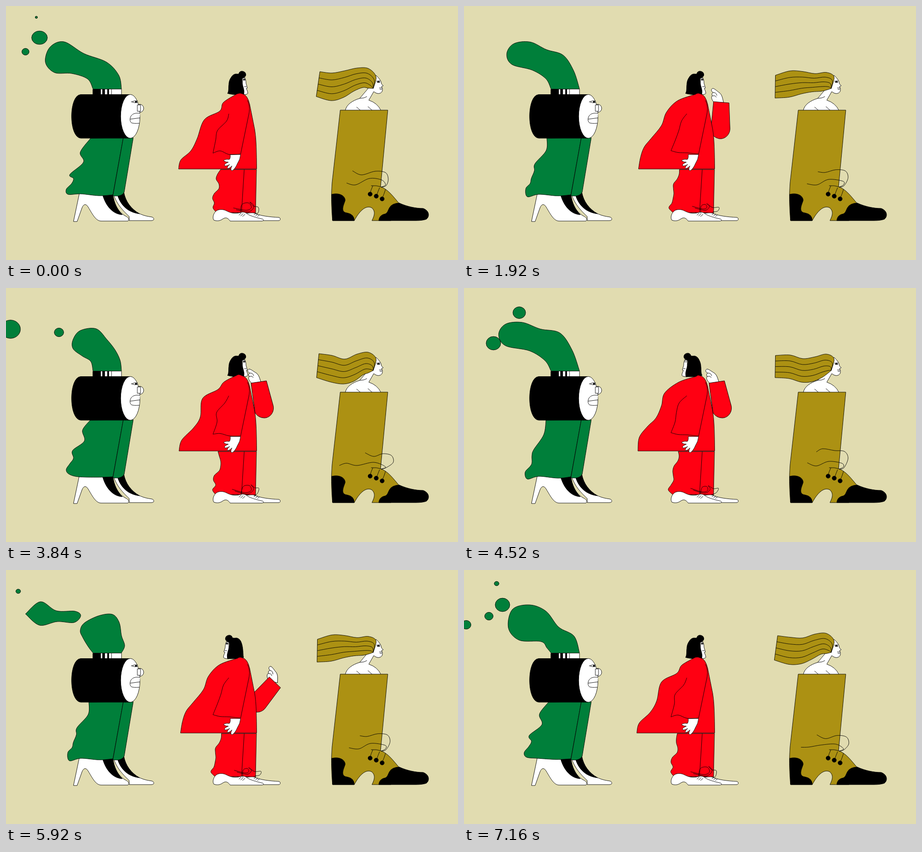
Recreate the animation shown at these times as an HTML page. Size 998 by 561 pixels, loop 7.2 s.

```html
<!DOCTYPE html>
<html lang="en">
<head>
<meta charset="utf-8">
<title>Three walkers</title>
<style>
html, body { margin: 0; width: 100%; height: 100%; overflow: hidden; background: #e1dcb0; }
svg { display: block; width: 100%; height: 100%; }
path, ellipse, circle { stroke: #000; stroke-width: .9; stroke-linejoin: round; vector-effect: non-scaling-stroke; }
.green { fill: #007f3a; }
.red { fill: #ff0012; }
.gold { fill: #ac9113; }
.white { fill: #fff; }
.line { fill: none; }
</style>
</head>
<body>
<svg viewBox="0 0 998 561">
  <g id="smoker">
    <path class="white" d="M238 418C247 442 262 455 272 465V474H321C328 474 328 468 322 466C285 462 265 440 260 411Z"/>
    <path d="M246 417C253 441 270 456 295 459C276 448 264 432 260 411Z"/>
    <path class="white" d="M162 414L149 476H157L167 448C171 436 177 436 182 445C190 458 198 475 210 475H269C273 473 272 467 262 463C246 453 238 436 236 416Z"/>
    <path d="M213 416C220 442 236 460 257 461C246 450 238 434 236 416Z"/>
    <path class="green" id="dress"/>
    <path class="green" d="M259 291H281L261 411C257 419 247 421 236 419Z"/>
    <path class="green" id="plume"/>
    <path class="white" d="M192 183.500H255V196H192Z"/>
    <path stroke="none" d="M192 184H209V196H192ZM213 184H218V196H213ZM224 184H227V196H224Z"/>
    <path class="line" d="M233 184V196"/>
    <path d="M165 195.500H274V292H165C138 290 138 197 165 195.500Z"/>
    <circle class="white" cx="295" cy="226" r="9"/>
    <ellipse class="white" cx="274.500" cy="243.700" rx="21.300" ry="48.300"/>
    <path class="white" stroke="none" d="M290 218.500H297V232.500H290Z"/>
    <path class="white" d="M296 237C287 236 280 237 276 243C273 248 273 255 277 258Q282 260 294 259"/>
    <path class="line" d="M274 250L296 247M276 212Q284 208 291 210M278 212Q285 215 291 213"/>
    <circle cx="287" cy="211.700" r="1.700"/>
    <g id="puffs"></g>
    <path class="green" id="peanut"/>
  </g>

  <g id="thinker">
    <g id="arm">
      <g id="fist">
        <path class="white" d="M543 211C536 204 534 199 537 195Q534 191 538 188C532 185 533 180 537 179C542 180 546 184 553 188C559 193 560 200 563 208Z"/>
        <path class="line" d="M538 188Q545 187 547 194M537 196Q543 193 546 198"/>
      </g>
      <path class="red" d="M541 210L575 205L590 260C593 273 584 287 570 287Q558 287 550 276Z"/>
    </g>
    <path class="white" d="M545 456C560 464 584 466 603 467C607 469 606 474 602 474H530V458Z"/>
    <path class="red" id="trousers"/>
    <path class="line" d="M526 361L520 456"/>
    <path class="white" d="M465 452C458 457 455 468 459 473C467 476 474 474 479 470C487 465 491 470 495 475H565C570 474 570 471 564 470C551 467 541 464 534 460Q526 453 518 456C506 460 496 457 488 453C479 448 470 449 465 452Z"/>
    <path class="line" d="M514 462l6-5m-2 7l6-6m-2 7l6-5m19 2l5-5m-1 7l5-5m-1 6l5-4"/>
    <path class="line" id="shoelaces"/>
    <path d="M491 192C492 166 496 151 508 150C520 151 523 166 524 192Z"/>
    <g id="head">
      <path class="white" d="M522 157C528 157 530 163 530 171L533 181L530.500 182Q534 189 534 193Q532 196 522 196Z"/>
      <path d="M489 193C493 188 491 180 492 174C492 159 502 150 514 150C515 143 523 142 528 147C532 153 528 158 522 159C519 165 522 173 524 180Q527 189 525 196H508Q495 195 489 193Z"/>
      <path class="line" d="M526 178L531 178M523 160L529 159"/>
      <path id="eye"/>
    </g>
    <path class="red" id="coat"/>
    <path class="white" d="M495 328Q496 336 493 339C488 338 480 339 481 342Q485 345 491 345C486 347 481 350 483 353Q487 354 494 350C490 353 487 358 490 359Q495 358 499 353C497 357 495 362 499 364Q506 360 511 348Q517 339 518 328Z"/>
    <path class="line" id="sleeve"/>
  </g>

  <g id="boot">
    <path class="white" d="M817 153Q829 164 829 172L833 176L829 178Q832 181 831 187C829 194 820 196 812 189L801 208Q820 214 828 231H749C752 217 765 209 781 204L798 184Z"/>
    <path class="line" d="M774 223L782 230M799 222L808 230M781 204Q791 204 797 200M824 181H831M825 184H830M818 166L826 165"/>
    <path id="womanEye"/>
    <path class="gold" id="hair"/>
    <path class="line" id="strands"/>
    <path class="gold" d="M738 230H843L827 399C844 405 855 421 868 436L850 474H808C815 460 815 453 808 446C794 438 779 455 769 474H721C717 430 719 405 720 390Z"/>
    <path d="M719 416C735 412 748 418 749 429C746 439 737 455 753 457Q769 460 769 474H721Z"/>
    <path d="M868 435C885 443 905 447 921 447C935 452 936 465 928 471Q920 474 905 474H823C824 466 828 462 834 460C843 459 843 451 847 445Q852 436 868 435Z"/>
    <path class="line" d="M806 397Q818 396 827 399M810 397Q805 407 804 415M825 401Q821 410 818 420M838 405Q835 415 830 426"/>
    <circle cx="804" cy="415.500" r="4.600"/><circle cx="817.500" cy="420" r="4.600"/><circle cx="830.500" cy="426" r="4.600"/>
    <path class="line" id="bootlaces"/>
  </g>
</svg>
<script>
const $ = id => document.getElementById(id);
const draw = (id, d) => $(id).setAttribute('d', d);
const move = (id, value) => $(id).setAttribute('transform', value);
const show = (el, on) => { el.style.display = on ? '' : 'none'; };
const mix = (a, b, k) => a + (b - a) * k;
const mixAll = (p, q, k) => p.map((v, i) => mix(v, q[i], k));
const pairs = v => v.flatMap((x, i) => i % 2 ? [] : [[x, v[i + 1]]]);
const numbers = text => text.split(/[ ,]/).map(Number);
const ramp = (t, from, length) => {
  const v = Math.min(1, Math.max(0, (t - from) / length));
  return v * v * (3 - 2 * v);
};

// Catmull-Rom segments, to be placed after a move to the first point
function curve(p) {
  return p.slice(1).map((b, i) => {
    const a = p[i], before = p[i - 1] || a, after = p[i + 2] || b;
    const c = [0, 1].map(n => a[n] + (b[n] - before[n]) / 6);
    const d = [0, 1].map(n => b[n] - (after[n] - a[n]) / 6);
    return `C${c} ${d} ${b}`;
  }).join('');
}
const spline = p => `M${p[0]}${curve(p)}`;

function keyed(times, span, keys) {
  return t => {
    let i = times.length - 1;
    while (times[i] > t) i--;
    const next = (i + 1) % times.length, end = next ? times[next] : span;
    return mixAll(keys[i], keys[next], (t - times[i]) / (end - times[i]));
  };
}
const flutter = (...keys) => keyed([0, 240, 480, 640], 800, keys.map(numbers));
const smoke = (...keys) => keyed([0, 240, 480, 560, 960, 1040, 1120, 1280, 1440, 2120, 2320], 2400,
  [0, 1, 1, 6, 1, 2, 2, 3, 4, 5, 6].map(i => numbers(keys[i])));

const dress = flutter(
  '187,292 164,323 171,345 141,372 149,381 145,392 133,405 137,416 165,415 205,419',
  '184,292 184,317 158,344 158,361 148,378 146,391 137,402 140,421 165,416 205,419',
  '181,292 176,324 154,357 150,370 150,386 146,394 135,407 140,422 165,416 207,420',
  '186,292 169,314 173,338 147,359 149,376 141,388 133,401 139,411 160,417 203,418');

const coat = flutter(
  '508,195 480,213 472,232 438,251 422,293 408,320 386,340 381,360',
  '510,195 470,210 449,236 436,266 408,295 394,315 391,337 386,360',
  '513,195 474,208 443,232 436,260 424,287 405,306 387,330 384,360',
  '513,191 482,207 468,224 434,244 429,285 414,309 388,336 382,360');

// Horizontal places at even heights
const sleeve = flutter('487 467 463', '483 477 467', '475 469 466', '483 465 466');
const trousers = flutter(
  '474 467 464 470 470 460 456 460 457 465',
  '477 475 470 462 463 464 461 460 453 462',
  '473 475 472 464 461 462 463 457 451 461',
  '468 471 474 474 471 460 458 463 456 463');

// Heights along the hair, from the loose end to the head
const hairTop = flutter('145 148 143 137 138', '155 141 139 148 147', '149 148 156 152 146', '145 149 157 146 142');
const hairBottom = flutter('200 209 202 188 180', '206 202 187 181 183', '198 200 208 207 199', '198 208 212 206 192');

const upperLace = flutter(
  '765,364 785,373 815,365 838,368 844,383', '783,368 800,374 822,363 843,366 848,381',
  '778,362 792,355 818,359 840,361 848,376', '793,364 812,372 832,366 851,370 855,385');
const lowerLace = flutter(
  '752,391 772,395 802,381 829,384', '757,396 780,396 805,383 838,387',
  '758,386 778,393 805,383 834,387', '736,392 752,387 775,392 812,385');

const plumeUnder = smoke(
  '180,161 145,149 107,147 87,124', '178,158 140,132 85,127 58,107',
  '182,170 170,150 164,134 173,117', '191,158 181,140 173,119 177,105',
  '187,162 168,150 148,134 148,114', '178,160 143,138 88,127 72,102',
  '183,172 170,158 122,155 98,128');
const plumeOver = smoke(
  '97,91 128,79 172,105 222,124 249,153', '67,75 107,66 144,97 208,108 244,142',
  '205,101 235,98 250,116 255,145 262,167', '192,96 216,94 236,106 247,128 253,155',
  '164,94 199,90 223,114 241,137 252,160', '87,79 124,75 165,89 210,97 238,136',
  '107,87 145,77 181,91 209,126 243,146');

const peanut = pairs(numbers('43,97 76,70 111,90 152,91 165,101 150,116 113,114 74,122 43,97'));

// Each puff: time, x, y, radius
const puffs = [
  ['1280 43 96 26', '1440 10 91 21', '1680 -40 87 15'],
  ['1280 136 99 14', '1440 117 98 10', '1680 84 94 0'],
  ['880 66 58 10', '1120 27 47 5', '1280 6 42 0'],
  ['2040 130 58 14', '2120 114 51 13', '2320 72 30 5', '2400 67 25 2.500', '2560 60 14 0'],
  ['2040 75 122 16', '2120 55 122 15', '2320 5 121 10', '2440 -25 120 7'],
  ['2320 85 77 15.500', '2400 74 70 16', '2640 63 48 17', '2960 0 38 0'],
  ['2320 55 102 9', '2400 43 101 7.700', '2640 31 80 6', '2800 16 70 0'],
  ['560 34 91 26', '960 -32 86 20']
].map(track => {
  const el = document.createElementNS('http://www.w3.org/2000/svg', 'ellipse');
  el.setAttribute('class', 'green');
  $('puffs').append(el);
  return { keys: track.map(numbers), el };
});

function drawPuff({ keys, el }, t) {
  if (t < keys[0][0]) t += 2400;
  const i = keys.findIndex((k, n) => n && t < k[0]);
  show(el, i > 0);
  if (i < 1) return;
  const [a, b] = [keys[i - 1], keys[i]];
  const [, x, y, r] = mixAll(a, b, (t - a[0]) / (b[0] - a[0]));
  // Large puffs flatten as they drift high
  const stretch = r > 14 && y < 75 ? 1 + (75 - y) / 60 : 1.04;
  Object.entries({ cx: x, cy: y, rx: r * stretch, ry: r / stretch }).forEach(([k, v]) => el.setAttribute(k, v));
}

function drawSmoke(t) {
  draw('plume', spline([[192, 183], ...pairs(plumeUnder(t)), ...pairs(plumeOver(t)), [255, 183]]));
  puffs.forEach(puff => drawPuff(puff, t));
  show($('peanut'), t >= 1040 && t < 1280);
  draw('peanut', spline(peanut));
  move('peanut', `translate(${(1120 - t) * .14} 0)`);
}

function drawHair(t, swing) {
  const topY = hairTop(t), bottomY = hairBottom(t);
  const top = topY.map((y, i) => [[690 + 3 * swing, 720, 748, 775, 800][i], y]);
  const bottom = bottomY.map((y, i) => [[686 - swing, 718, 745, 768, 788][i], y]);
  top.push([817, 156], [811, 182]);
  bottom.push([800, mix(bottomY[4], 183, .5)], [811, 182]);
  const back = [...bottom].reverse();
  draw('hair', `${spline(top)}${curve(back)}Z`);
  draw('strands', [.25, .5, .75].map(k => spline(top.map((p, i) => mixAll(p, bottom[i], k)))).join(''));
}

function drawCloth(t) {
  const angle = t / 800 * 2 * Math.PI, swing = Math.cos(angle);
  const back = pairs(coat(t));
  draw('dress', spline([...pairs(dress(t)), [236, 417]]) + 'L259 291Z');
  draw('coat', `${spline(back)}H553.500C553 325 553 295 549 272L538 217Q533 196 522 194Q516 191 ${back[0]}`);
  draw('trousers', spline(trousers(t).map((x, i) => [x, 361 + 10.600 * i])) + 'H520L551 457L553 361Z');

  const corner = [457, 322 + 3 * swing];
  const fold = sleeve(t).map((x, i) => [x, 254 + 21 * i]);
  draw('sleeve', spline([[492, 238], ...fold, corner])
    + curve([corner, [473, 322 - 2 * swing], [493, 326 + 2 * swing], [518, 327]])
    + 'L537 235Q539 220 533 208');

  drawHair(t, swing);
  draw('bootlaces', spline([...pairs(upperLace(t)), [839, 397], [828, 400]])
    + spline([...pairs(lowerLace(t)), [838, 395], [828, 400]]));

  const loops = ['502,444 528,450 539,446 535,437 523,440 520,457', '508,448 534,453 545,443 538,435 548,443 560,444 558,454 549,457'];
  draw('shoelaces', loops.map(loop => spline(pairs(numbers(loop)).map(([x, y], i) =>
    [x + 3 * Math.sin(angle + i), y + 2 * Math.cos(angle + i)]))).join(''));
}

// Elbow x, y, arm angle, wrist angle
const armPoses = [[570, 275, 0, 0], [548, 299, 52, -32], [505, 275, 165, -20]];

function drawArm(t) {
  const lift = 2 * (1 - ramp(t, 1640, 360) + ramp(t, 5680, 480));
  show($('arm'), lift < 2);
  const i = Math.min(1, Math.floor(lift));
  const [x, y, angle, wrist] = mixAll(armPoses[i], armPoses[i + 1], lift - i);
  move('arm', `translate(${x} ${y}) rotate(${angle}) translate(-570 -275)`);
  move('fist', `rotate(${wrist} 555 207)`);
}

function drawHead(t) {
  const turned = ramp(t, 4040, 480) - ramp(t, 6640, 520);
  const axis = 507.500 - ramp(t, 4520, 120) + ramp(t, 6640, 520);
  move('head', `translate(${axis} 0) scale(${1 - 2 * turned} 1) translate(-507.500 0)`);
  draw('eye', t >= 4360 && t < 4600 ? 'M523 163H529' : 'M523 163Q526 160 529 163Q526 165 523 163');
  draw('womanEye', t >= 1200 && t < 1360 ? 'M818 168H826' : 'M819 168Q823 165 826 168Q822 170 819 168');
}

const start = performance.now();
function frame() {
  const t = (performance.now() - start) % 7200;
  const slow = Math.floor(t / 80) * 80, fast = Math.floor(t / 40) * 40;
  drawSmoke(slow % 2400);
  drawCloth(slow % 800);
  drawArm(fast);
  drawHead(fast);
  requestAnimationFrame(frame);
}
frame();
</script>
</body>
</html>
```
